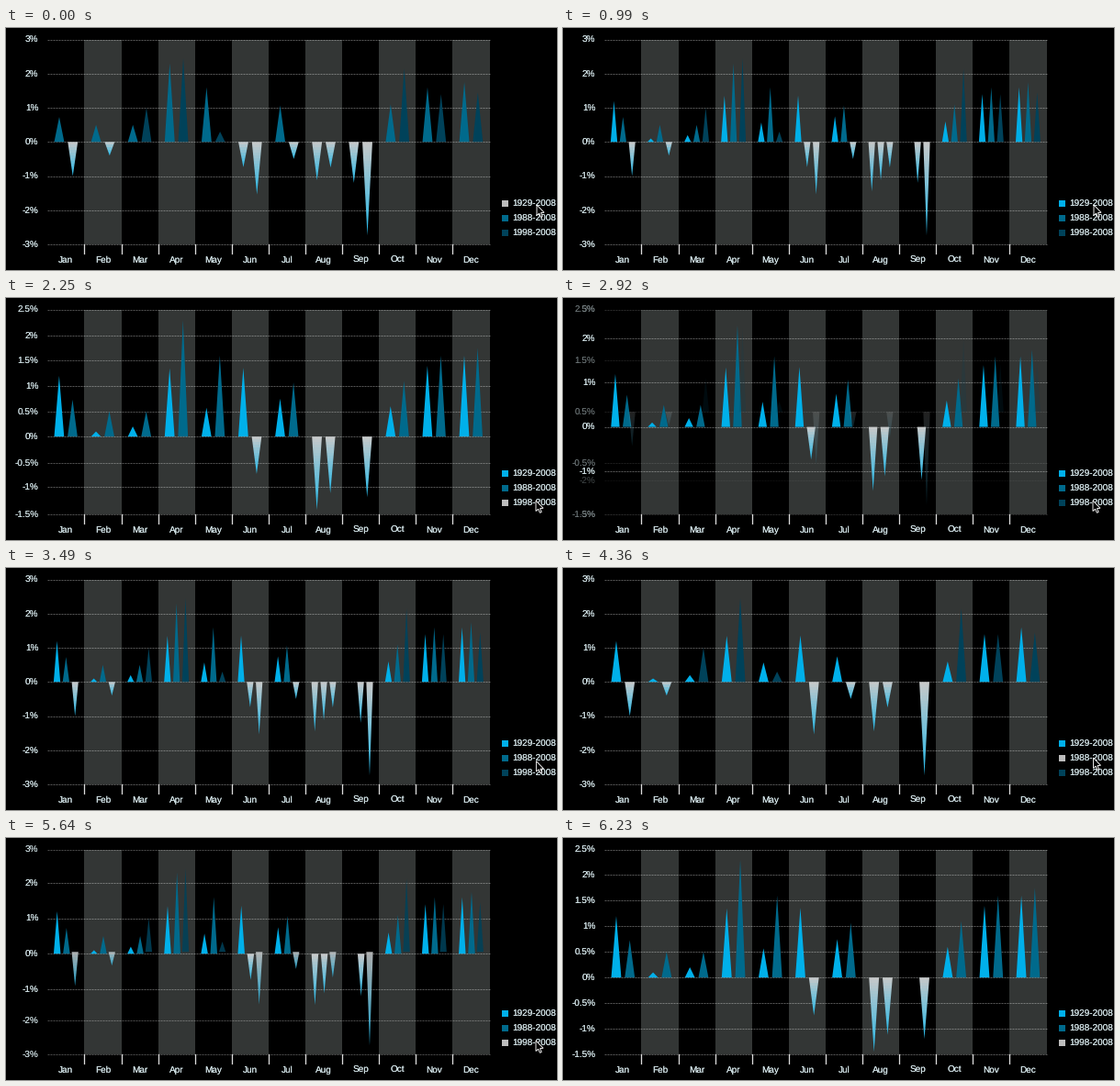
Animation of 600 by 264 pixels, one loop 6840 ms. Source, as a matplotlib script:

```python
import numpy as np
import matplotlib.pyplot as plt
from matplotlib.animation import FuncAnimation
from matplotlib.collections import PolyCollection
from matplotlib.colors import to_rgb
from matplotlib.patches import Polygon, Rectangle

W, H, DPI = 600, 264, 100
LOOP, STEP, FADE = 6840, 30, 520
PX = 72 / DPI

plt.rcParams.update({
    "font.family": "Liberation Sans",
    "font.size": 10 * PX,
    "text.hinting": "none",
    "text.color": "#d3e4e8",
})

MONTHS = "Jan Feb Mar Apr May Jun Jul Aug Sep Oct Nov Dec".split()
COLORS = [to_rgb(c) for c in ("#00b0ea", "#006a8c", "#00425a")]
GRAY, TIP = np.array(to_rgb("#c9c9c9")), np.array(to_rgb("#22b8e8"))

# Monthly mean change in percent since each start year
DATA = {
    1929: [1.2, .1, .2, 1.35, .57, 1.36, .75, -1.45, 0, .6, 1.4, 1.6],
    1988: [.73, .5, .5, 2.3, 1.6, -.74, 1.07, -1.12, -1.2, 1.1, 1.6, 1.75],
    1998: [-1, -.4, 1, 2.45, .3, -1.54, -.5, -.75, -2.74, 2.15, 1.4, 1.45],
}
# Each click (time, series) toggles one legend entry
CLICKS = [(480, 0), (1790, 2), (2680, 2), (3820, 1), (4530, 1), (5555, 2)]

LEFT, BAND, TOP, BOTTOM = 45.3, 40.1, 12.5, 236
MID = np.arange(12) * BAND + LEFT + BAND / 2
GROUP, FILL = 29.5, .74     # width of a month's bars, share of a slot filled


def scale(low, high):
    """Zero line and pixels per percent for an axis range."""
    unit = (BOTTOM - TOP) / (high - low)
    return np.array([TOP + high * unit, unit])


WIDE, NARROW = scale(-3, 3), scale(-1.5, 2.5)
WIDE_TICKS, NARROW_TICKS = set(np.arange(-3, 4.0)), set(np.arange(-1.5, 3, .5))


def ease(x):
    x = np.clip(x, 0, 1)
    return x * x * (3 - 2 * x)


def mix(a, b, k):
    return a + (b - a) * k


def states(t):
    """Legend switches and eased visibility of the three series."""
    on, vis = [0, 1, 1], [0.0, 1.0, 1.0]
    for start, s in CLICKS:
        if t < start:
            break
        vis[s] = mix(on[s], 1 - on[s], ease((t - start) / FADE))
        on[s] = 1 - on[s]
    return on, vis


def pointer(t):
    """Glide to the next legend entry shortly before its click, then leave."""
    row = 0
    for start, s in CLICKS:
        row = mix(row, s, ease((t - start + 440) / 150))
    return np.array([578 - row / 2, 193 + 14 * row + 47 * ease((t - 6060) / 140)])


def label(x, y, text, **kw):
    """Text laid down twice for a slightly heavier stroke."""
    return [ax.text(x, y, text, va="baseline", zorder=4, **kw) for _ in range(2)]


fig = plt.figure(figsize=(W / DPI, H / DPI), dpi=DPI, facecolor="black")
ax = fig.add_axes([0, 0, 1, 1])
ax.set_xlim(0, W)
ax.set_ylim(H, 0)
ax.axis("off")

for i, (x, month) in enumerate(zip(MID, MONTHS)):
    edge = x - BAND / 2
    if i % 2:
        ax.add_patch(Rectangle((edge, TOP), BAND, BOTTOM - TOP, fc="#333635", lw=0, zorder=0))
    if i:
        ax.plot([edge, edge], [BOTTOM, BOTTOM + 9.5], color="#dddddd", lw=1.3 * PX)
    label(x, 256.4, month, ha="center")

markers = []
for s, year in enumerate(DATA):
    y = 191.5 + 16 * s
    markers.append(ax.add_patch(Rectangle((540, y - 3.5), 7, 7, lw=0)))
    label(551.5, y + 3.7, f"{year}-2008")

grid = []
for v in WIDE_TICKS | NARROW_TICKS:
    line, = ax.plot([LEFT, LEFT + 12 * BAND], [0, 0], color="white", lw=PX,
                    dashes=(2, 1), dash_capstyle="butt", zorder=1)
    grid.append((v, line, label(35.2, 0, f"{v:g}%", ha="right")))

bars = PolyCollection([], linewidths=0, zorder=3)
bars.set_snap(False)
ax.add_collection(bars)

ARROW = np.array([(0, 0), (0, 11.5), (2.6, 9.2), (4.4, 13.3),
                  (6.2, 12.5), (4.5, 8.6), (8, 8.3)])
cursor = ax.add_patch(Polygon(ARROW, fc="black", ec="white", lw=.9 * PX, zorder=9))


def spike(x, width, zero, tip, color, alpha):
    """Upward spikes are flat, downward ones fade from gray to blue."""
    half = width / 2
    if tip <= zero:
        return [[(x - half, zero), (x + half, zero), (x, tip)]], [(*color, alpha)]
    cuts = [zero, *range(int(zero) + 3, int(np.ceil(tip)), 3), tip]
    polys, fills = [], []
    for a, b in zip(cuts, cuts[1:]):
        ka, kb = ((q - zero) / (tip - zero) for q in (a, b))
        wa, wb = half * (1 - ka), half * (1 - kb)
        polys.append([(x - wa, a), (x + wa, a), (x + wb, b), (x - wb, b)])
        fills.append((*mix(GRAY, TIP, (ka + kb) / 2), alpha))
    return polys, fills


def draw_bars(vis):
    off = int(np.argmin(vis))
    gap = 1 - vis[off]
    rest = [s for s in range(3) if s != off]
    polys, fills = [], []
    for s, values in enumerate(DATA.values()):
        if vis[s] < .01:
            continue
        slot, shift, (zero, unit) = GROUP / 3, (s - 1) * GROUP / 3, WIDE
        if s != off:
            slot = mix(slot, GROUP / 2, gap)
            shift = mix(shift, (rest.index(s) - .5) * GROUP / 2, gap)
            zero, unit = mix(NARROW, WIDE, vis[2])
        for x, v in zip(MID, values):
            p, f = spike(x + shift, slot * FILL, zero, zero - v * unit,
                         COLORS[s], vis[s] ** 2)
            polys += p
            fills += f
    bars.set_verts(polys)
    bars.set_facecolor(fills)


def draw_grid(k):
    """Shared ticks slide between the two scales, the others fade in place."""
    for v, line, texts in grid:
        if v in WIDE_TICKS & NARROW_TICKS:
            (zero, unit), alpha = mix(NARROW, WIDE, k), 1
        elif v in WIDE_TICKS:
            (zero, unit), alpha = WIDE, k ** 2
        else:
            (zero, unit), alpha = NARROW, (1 - k) ** 2
        y = zero - v * unit
        line.set_ydata([y, y])
        line.set_alpha(.35 * alpha)
        for text in texts:
            text.set_y(y + 3.7)
            text.set_alpha(alpha)


def update(i):
    t = i * STEP
    on, vis = states(t)
    draw_bars(vis)
    draw_grid(vis[2])
    for marker, color, lit in zip(markers, COLORS, on):
        marker.set_facecolor(color if lit else "#bdbdbd")
    cursor.set_xy(ARROW + pointer(t))
    cursor.set_visible(t < 6200)
    return []


anim = FuncAnimation(fig, update, frames=LOOP // STEP, interval=STEP,
                     init_func=lambda: update(0), repeat=True, repeat_delay=0)
plt.show()
```
